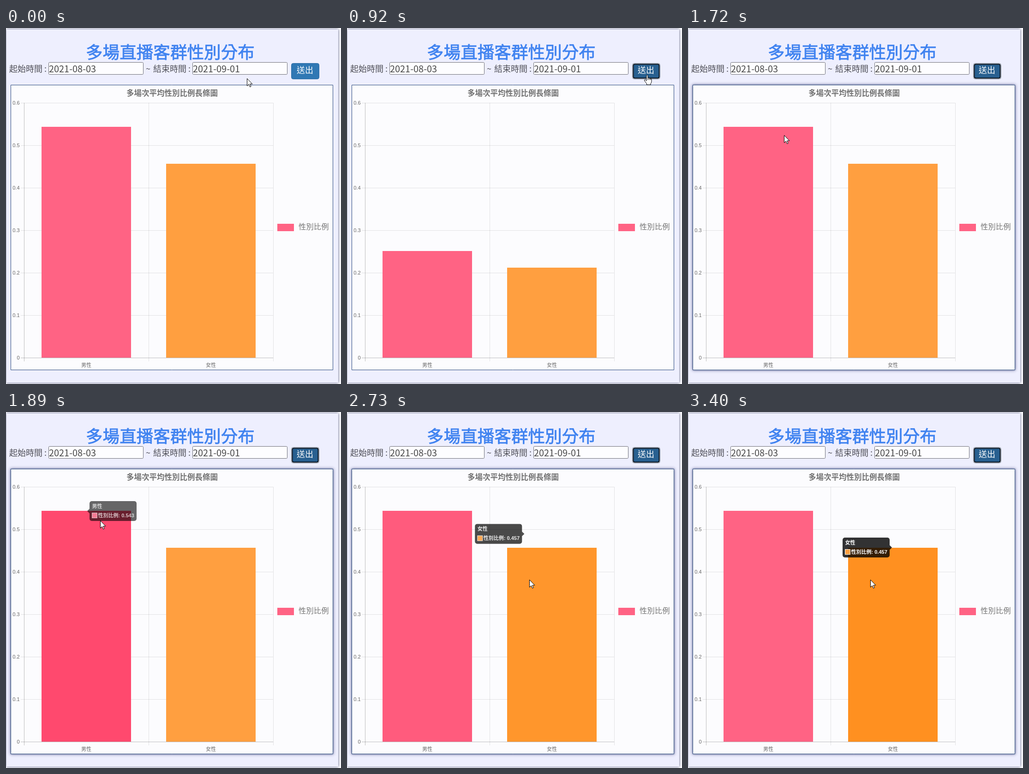
Write an HTML page with a canvas that moves like this. It is 726 px wide and 771 px high and loops after 3.56 s.

```html
<!DOCTYPE html>
<html lang="zh-Hant">
<head>
<meta charset="utf-8">
<style>
html, body { margin: 0; width: 100%; height: 100%; overflow: hidden; }
canvas { display: block; }
</style>
</head>
<body>
<canvas id="stage" width="726" height="771"></canvas>
<script>
const ctx = document.getElementById('stage').getContext('2d');
const LOOP = 3560;
const CJK = '"Noto Sans CJK TC", "Noto Sans CJK", sans-serif';
const ARIAL = '"Liberation Sans", "Noto Sans CJK TC", "Noto Sans CJK", sans-serif';
const BASE = 714, PER_UNIT = 920;
const PINK = [255, 99, 132], ORANGE = [255, 159, 64];
const BARS = [
  { name: '男性', value: 0.543, x: 77, color: PINK, hover: [255, 64, 102] },
  { name: '女性', value: 0.457, x: 347, color: ORANGE, hover: [255, 144, 32] }
];
const BAR_W = 194;

// Moments of the interaction, in ms
const FOCUS = 620, REDRAW = 777, HOVER_MALE = 1777, LEAVE_MALE = 2610, HOVER_FEMALE = 2644;

// Pointer stops: time, x, y
const STOPS = [
  [150, 522, 109], [570, 650, 101], [1090, 650, 101], [1170, 641, 106],
  [1690, 208, 232], [1740, 208, 232], [1800, 204, 235],
  [2560, 204, 235], [2686, 395, 363]
];

const clamp = v => Math.min(1, Math.max(0, v));
const mix = (a, b, k) => a + (b - a) * k;
const rgb = c => `rgb(${c.map(Math.round)})`;
const outQuart = (t, start, length) => 1 - (1 - clamp((t - start) / length)) ** 4;
const hoverEase = (t, start) => outQuart(t, start, 400);
const smooth = k => k * k * (3 - 2 * k);

function pointerAt(t) {
  let [, x, y] = STOPS[0];
  for (let i = 1; i < STOPS.length; i++) {
    const [from] = STOPS[i - 1], [to, nx, ny] = STOPS[i];
    const k = smooth(clamp((t - from) / (to - from)));
    x = mix(x, nx, k);
    y = mix(y, ny, k);
  }
  return [x, y];
}

function rect(x, y, w, h, color) {
  ctx.fillStyle = color;
  ctx.fillRect(x, y, w, h);
}

function round(x, y, w, h, r, fill, stroke, width = 1) {
  ctx.beginPath();
  ctx.roundRect(x, y, w, h, r);
  if (fill) { ctx.fillStyle = fill; ctx.fill(); }
  if (stroke) { ctx.strokeStyle = stroke; ctx.lineWidth = width; ctx.stroke(); }
}

function text(str, x, y, font, color, align = 'left') {
  ctx.font = font;
  ctx.fillStyle = color;
  ctx.textAlign = align;
  ctx.fillText(str, x, y);
}

function glowRect(x, y, w, h, fill, glow, blur) {
  ctx.save();
  ctx.shadowColor = glow;
  ctx.shadowBlur = blur;
  rect(x, y, w, h, fill);
  ctx.restore();
}

function drawForm(hovered, focused) {
  const title = '多場直播客群性別分布';
  text(title, 173, 66, `500 36.6px ${CJK}`, '#4083f0');
  ctx.strokeStyle = '#4083f0';
  ctx.lineWidth = 0.8;
  ctx.strokeText(title, 173, 66);

  const label = `300 18px ${CJK}`;
  text('起始時間 :', 7, 95, label, '#505058');
  text('~', 303, 95, label, '#505058');
  text('結束時間 :', 319, 95, label, '#505058');
  [[92, '2021-08-03'], [404, '2021-09-01']].forEach(([x, date]) => {
    round(x + 0.5, 74.5, 205, 26, 2, '#fdfdff', '#707078');
    text(date, x + 1, 95.5, `300 19.9px ${CJK}`, '#484848');
  });
  if (focused) {
    round(618.5, 76.5, 60, 34, 4, '#fff', '#788494');
    round(620.5, 78.5, 56, 30, 3, '#286090', '#08101c', 2);
  } else {
    round(618.5, 76.5, 60, 34, 4, hovered ? '#286090' : '#3078b4', hovered ? '#204d74' : '#2e6da4');
  }
  text('送出', 630, 97.5, `18px ${CJK}`, '#fff');
}

function drawChart(t, glowing) {
  if (glowing) glowRect(10, 123, 699, 618, '#223c78', 'rgba(50,55,110,.9)', 6);
  round(10.5, 123.5, 698, 617, 0, '#fcfcfe', '#2a4a7c');
  text('多場次平均性別比例長條圖', 360, 147, `bold 16.5px ${CJK}`, '#727272', 'center');

  for (let i = 0; i <= 6; i++) {
    const y = BASE - i * 92;
    rect(32, y, 547, 1, `rgba(0,0,0,${i ? 0.1 : 0.25})`);
    text(i ? (i / 10).toFixed(1) : '0', 29.5, y + 4, `11px ${ARIAL}`, '#666', 'right');
  }
  [39, 309, 579].forEach((x, i) => rect(x, 162, 1, 560, `rgba(0,0,0,${i ? 0.1 : 0.25})`));

  const grow = t < REDRAW ? 1 : outQuart(t, REDRAW, 1000);
  const lit = [
    hoverEase(t, HOVER_MALE) * (1 - hoverEase(t, LEAVE_MALE)),
    hoverEase(t, HOVER_FEMALE)
  ];
  BARS.forEach((bar, i) => {
    const h = Math.round(bar.value * PER_UNIT * grow);
    rect(bar.x, BASE - h, BAR_W, h, rgb(bar.color.map((c, j) => mix(c, bar.hover[j], lit[i]))));
    text(bar.name, bar.x + BAR_W / 2, 734, `11px ${ARIAL}`, '#666', 'center');
  });

  rect(588, 424, 36, 16, rgb(PINK));
  text('性別比例', 634, 436, `300 16.4px ${CJK}`, '#767676');
}

function drawTooltip(t) {
  if (t <= HOVER_MALE) return;
  const onFemale = t >= HOVER_FEMALE;
  const bar = BARS[+onFemale];
  const move = hoverEase(t, HOVER_FEMALE);
  const fade = hoverEase(t, HOVER_MALE) * (1 - hoverEase(Math.min(t, HOVER_FEMALE), LEAVE_MALE));
  const x = mix(181, 335, move), y = mix(193, 272, move);
  const w = 102, h = 43, mid = y + h / 2;
  const edge = onFemale ? x + w : x, tip = onFemale ? edge + 5 : edge - 5;

  ctx.save();
  ctx.globalAlpha = mix(fade, 1, move);
  ctx.beginPath();
  ctx.roundRect(x, y, w, h, 5);
  ctx.fillStyle = 'rgba(0,0,0,.8)';
  ctx.fill();
  ctx.beginPath();
  ctx.moveTo(edge, mid - 5);
  ctx.lineTo(tip, mid);
  ctx.lineTo(edge, mid + 5);
  ctx.fill();
  text(bar.name, x + 5.5, y + 15, `bold 11px ${ARIAL}`, '#fff');
  rect(x + 5, y + 25, 12, 12, '#fff');
  rect(x + 6, y + 26, 10, 10, rgb(bar.color));
  text(`性別比例: ${bar.value}`, x + 18.5, y + 34.5, `bold 11px ${ARIAL}`, '#fff');
  ctx.restore();
}

const ARROW = new Path2D('M0 0V16L3.7 12.6L6.2 18.2L8.6 17.2L6.2 11.7H11.3Z');
const HAND = new Path2D('M-1.5 1.5Q0 -1 1.5 1.5V7Q3.5 5.8 4.5 7.5Q6.5 6.5 7.3 8.5Q9.5 8 9.5 10.5V14Q9.5 17 7.5 19V21.5H-1V19L-6 12.5Q-6.5 10 -4 10.5L-1.5 13Z');

function drawPointer(x, y, hand) {
  const shape = hand ? HAND : ARROW;
  ctx.save();
  ctx.translate(Math.round(x) + 0.5, Math.round(y) + 0.5);
  ctx.fillStyle = '#fff';
  ctx.fill(shape);
  ctx.strokeStyle = '#000';
  ctx.lineWidth = 1;
  ctx.stroke(shape);
  if (hand) {
    ctx.beginPath();
    [1.5, 4.5, 7.3].forEach(fx => { ctx.moveTo(fx, 7.5); ctx.lineTo(fx, 11); });
    ctx.stroke();
  }
  ctx.restore();
}

function draw(now) {
  const t = now % LOOP;
  const [x, y] = pointerAt(t);
  const onButton = x >= 618 && x < 679 && y >= 76 && y < 111;
  rect(0, 0, 726, 771, '#fbfbfe');
  glowRect(1, 3, 719, 765, '#eeeffe', 'rgba(50,55,100,.9)', 5);
  drawForm(onButton, t >= FOCUS);
  drawChart(t, y >= 123);
  drawTooltip(t);
  drawPointer(x, y, onButton);
  requestAnimationFrame(draw);
}
requestAnimationFrame(draw);
</script>
</body>
</html>
```
